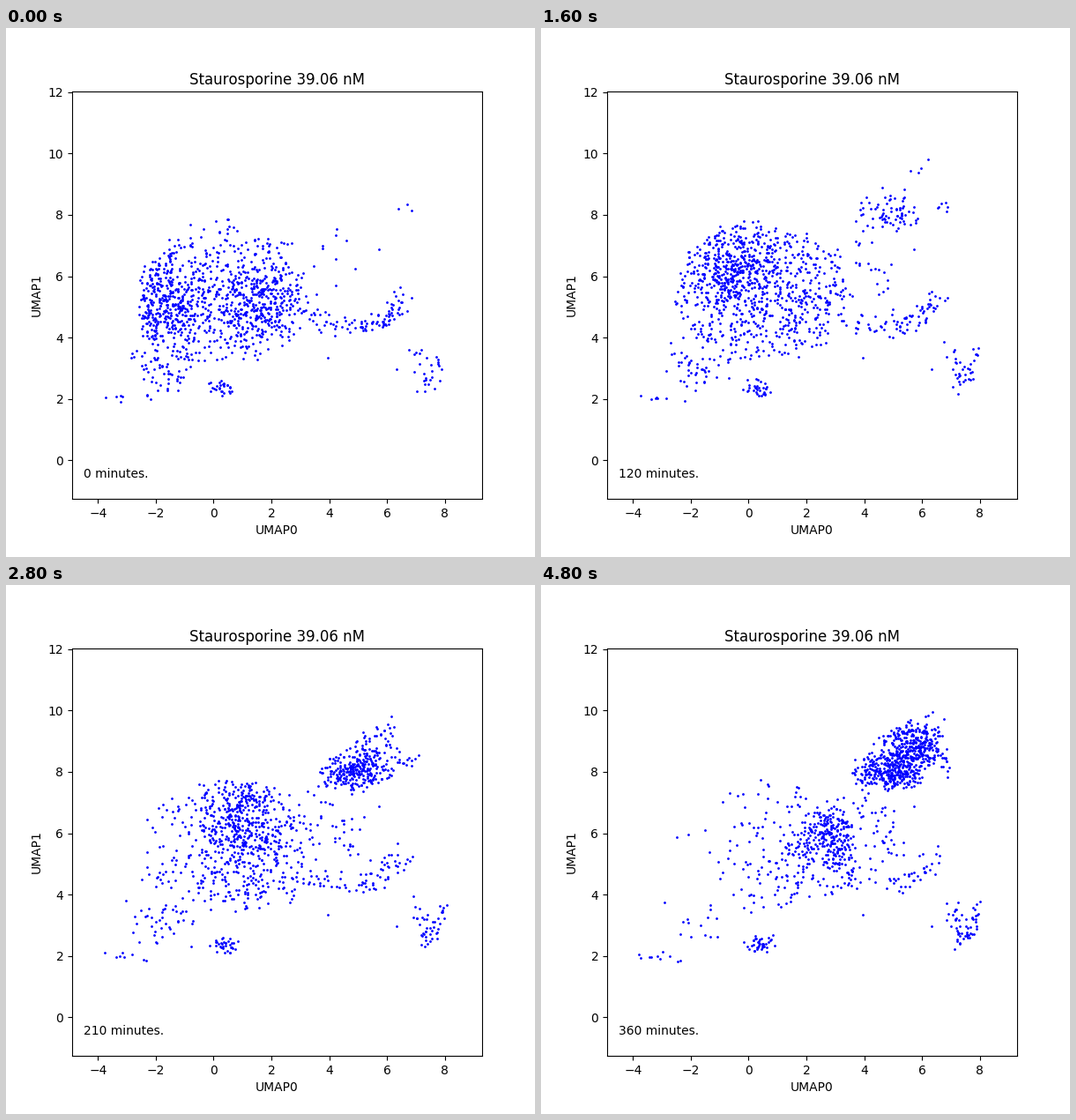
A matplotlib script for the animation above (5.2 s loop, 600 by 600 pixels).

```python
import numpy as np
import matplotlib.pyplot as plt
from matplotlib.animation import FuncAnimation
from matplotlib.path import Path

FRAMES = 13
STEP_MS = 400
STEP_MIN = 30
DRIFT = 0.25     # how far cells wander per frame
POOL = 4000
RESIDENTS = 1020  # cells shared between the body and the cloud
MIGRANTS = 600    # cells that end up in the cloud

plt.rcParams["text.kerning_factor"] = 6

BODY = Path([(-2.5, 4.1), (-2.55, 5.8), (-2.0, 6.9), (-1.1, 7.5), (0.3, 7.9),
             (1.4, 7.75), (2.9, 7.0), (3.7, 6.1), (3.6, 4.3), (1.8, 3.5),
             (0.6, 3.3), (-1.1, 3.0), (-2.5, 4.1)])
CLOUD = Path([(3.6, 7.5), (3.6, 8.3), (4.6, 9.15), (5.5, 9.7), (6.2, 9.85),
              (6.7, 9.5), (6.5, 8.3), (5.9, 7.6), (5.0, 7.4), (3.6, 7.5)])

# Thin groups strung along a line: key points, width, cells at start and end.
STREAMS = [
    ([(-1.2, 3.0), (-1.9, 2.8), (-2.5, 3.8)], 0.35, 56, 14),
    ([(-2.2, 1.9), (-2.9, 2.0), (-3.8, 2.05)], 0.07, 6, 10),
    ([(3.3, 4.6), (4.8, 4.35), (6.0, 4.6), (6.5, 5.4)], 0.2, 85, 48),
    ([(7.0, 3.7), (7.4, 2.4), (7.95, 3.7)], 0.17, 28, 56),
    ([(0.0, 2.35), (0.7, 2.4)], 0.14, 27, 38),
    ([(3.6, 7.2), (4.7, 6.2), (4.6, 5.0)], 0.4, 10, 50),
    ([(6.6, 8.5), (7.0, 8.1)], 0.14, 3, 13),
    ([(6.0, 9.3), (6.25, 10.0)], 0.06, 0, 7),
]
STRAYS = [(5.72, 6.87), (3.95, 3.33), (6.33, 2.98)]


def smooth(u):
    u = np.clip(u, 0, 1)
    return u * u * (3 - 2 * u)


def mix(a, b, t):
    return (1 - t) * np.array(a) + t * np.array(b)


def wander(rng, frame, size=POOL):
    """Normal offsets that turn slowly but keep their spread."""
    a, b = rng.normal(size=(2, size, 2))
    return a * np.cos(DRIFT * frame) + b * np.sin(DRIFT * frame)


def blob(seed, frame, centre, spread, n, outline):
    rng = np.random.default_rng(seed)
    pts = centre + np.array(spread) * wander(rng, frame)
    fuzz = rng.normal(0, 0.07, pts.shape)
    return pts[outline.contains_points(pts + fuzz)][:int(n)]


def stream(seed, frame, t, keys, width, n0, n1):
    rng = np.random.default_rng(seed)
    size = max(n0, n1)
    s = rng.uniform(0, len(keys) - 1, size)
    line = np.array([np.interp(s, range(len(keys)), c) for c in zip(*keys)]).T
    offset = np.clip(wander(rng, frame, size), -2, 2)
    return (line + width * offset)[:round(mix(n0, n1, t))]


def cells(frame):
    t = frame / (FRAMES - 1)
    gone = MIGRANTS * smooth((t - 0.15) / 0.85)
    early = 300 * np.exp(-8 * t) + 60
    hot = 330 - 100 * smooth(t)
    # The densest part of the body swings over the top from left to right.
    a = np.radians(mix(195, 25, t ** 0.8))
    hot_at = (0.7 + 2.5 * np.cos(a), 5.4 + 1.1 * np.sin(a))
    plume = 0.6 * t
    parts = [
        blob(1, frame, (0.4 + t, 5.4), (2.2, 1.8),
             RESIDENTS - gone - early - hot, BODY),
        blob(2, frame, hot_at, mix((0.75, 0.85), (0.6, 0.65), t), hot, BODY),
        blob(3, frame, (1.5, 5.0), (0.8, 0.75), early, BODY),
        blob(4, frame, (4.8, 7.95), (0.65, 0.32), gone * (1 - plume), CLOUD),
        blob(5, frame, mix((5.0, 8.2), (5.7, 8.75), t), (0.7, 0.5),
             gone * plume, CLOUD),
    ]
    parts += [stream(20 + i, frame, t, *s) for i, s in enumerate(STREAMS)]
    return np.vstack(parts + [STRAYS])


fig, ax = plt.subplots(figsize=(6, 6), dpi=100)
ax.set_xlim(-4.893, 9.287)
ax.set_ylim(-1.25, 12.016)
ax.set_title("Staurosporine 39.06 nM")
ax.set_xlabel("UMAP0")
ax.set_ylabel("UMAP1")
dots, = ax.plot([], [], "o", color="blue", ms=1, mew=1)
label = ax.text(-4.5, -0.555, "")


def draw(frame):
    dots.set_data(*cells(frame).T)
    label.set_text(f"{frame * STEP_MIN} minutes.")
    return dots, label


anim = FuncAnimation(fig, draw, frames=FRAMES, interval=STEP_MS,
                     repeat=True, repeat_delay=0, blit=False)
plt.show()
```
